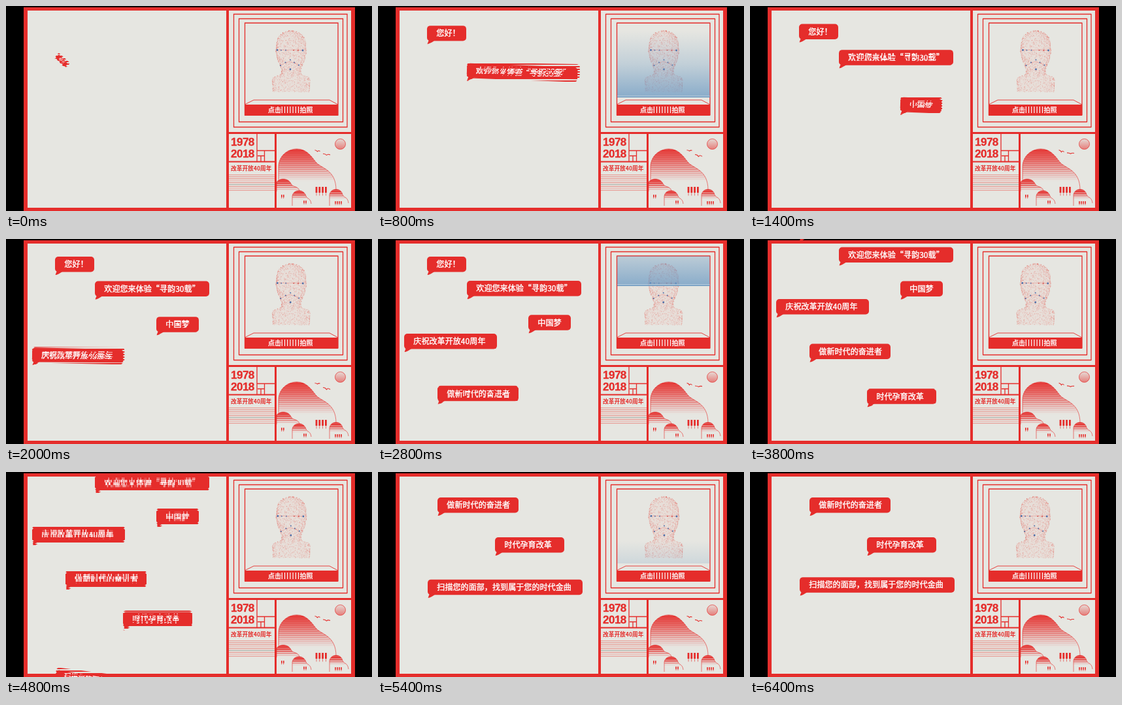
Recreate the animation shown at these times as an HTML page with a canvas. Size 560 px wide and 314 px high, loop 6600 ms.

```html
<!DOCTYPE html>
<html lang="zh-CN">
<head>
<meta charset="utf-8">
<style>
html, body { margin: 0; width: 100%; height: 100%; overflow: hidden; background: #000; }
canvas { display: block; }
</style>
</head>
<body>
<canvas width="560" height="314"></canvas>
<script>
const ctx = document.querySelector('canvas').getContext('2d');
const RED = '#e52d2b', PAPER = '#e6e6e1', BLUE = '#4a6da8';
const LOOP = 6600, STEP = 200, CYCLE = 2200;
const CJK = '"Noto Sans CJK SC", "Noto Sans CJK", sans-serif';
const LATIN_BOLD = 'bold 17px "Liberation Sans", Arial, sans-serif';
const TAU = Math.PI * 2;
const clamp = v => Math.max(0, Math.min(1, v));
const ease = p => p < .5 ? 4 * p ** 3 : 1 - (2 - 2 * p) ** 3 / 2;
const smooth = p => p * p * (3 - 2 * p);

// text, x, settled y, width, entry time
const bubbles = [
  ['您好！', 75, 27, 60, -160],
  ['欢迎您来体验“寻韵30载”', 136, 64, 175, 450],
  ['中国梦', 230, 116, 65, 1050],
  ['庆祝改革开放40周年', 40, 143.5, 142, 1640],
  ['做新时代的奋进者', 91, 211.5, 124, 2290],
  ['时代孕育改革', 179, 272.5, 106, 3150],
  ['扫描您的面部，找到属于您的时代金曲', 76, 333.5, 237, 4500]
];

function box(x0, y0, x1, y1, color) {
  ctx.fillStyle = color;
  ctx.fillRect(x0, y0, x1 - x0, y1 - y0);
}

function line(d, width = 1, color = RED) {
  ctx.strokeStyle = color;
  ctx.lineWidth = width;
  ctx.stroke(new Path2D(d));
}

// A hairline outline gives the regular face a medium weight.
function label(text, x, y, font, color, outline = 0) {
  ctx.font = font;
  ctx.fillStyle = ctx.strokeStyle = color;
  ctx.fillText(text, x, y);
  if (!outline) return;
  ctx.lineWidth = outline;
  ctx.lineJoin = 'round';
  ctx.strokeText(text, x, y);
}

function dot(x, y, r, color) {
  ctx.fillStyle = color;
  ctx.beginPath();
  ctx.arc(x, y, r, 0, TAU);
  ctx.fill();
}

function fade(y0, y1, rgb, ...alphas) {
  const g = ctx.createLinearGradient(0, y0, 0, y1);
  alphas.forEach((a, i) => g.addColorStop(i / (alphas.length - 1), `rgba(${rgb},${a})`));
  return g;
}

// Horizontal bars that get thinner towards the foot.
function hill(d, top, bottom) {
  const path = new Path2D(d);
  ctx.save();
  ctx.clip(path);
  for (let y = top; y < bottom; y += 1.5) {
    box(414, y, 528, y + 1.5 * (1 - (y - top) / (bottom - top)), RED);
  }
  ctx.restore();
  line(d, .6);
}

function trees(x, y, count, gap, width, height) {
  for (let i = 0; i < count; i++) {
    const cx = x + i * gap;
    box(cx - width / 2, y, cx + width / 2, y + height, RED);
    box(cx - .3, y + height, cx + .3, y + height * 1.5, RED);
  }
}

function drawFrames() {
  box(0, 0, 560, 314, '#000');
  box(27, 2, 534, 314, RED);
  box(33, 7, 337, 309, PAPER);
  box(341, 7, 528, 193, PAPER);
  box(341, 196, 411, 309, PAPER);
  box(414, 196, 528, 309, PAPER);
  line('M348.5 12.5H522V185.5H348.5Z M356.5 19.5H515.5V177.5H356.5Z M365.5 26H508V167H365.5Z', 1.3);
}

function drawButton() {
  line('M365 151L379 144H495L508 151', .9);
  box(365, 151, 508, 168, RED);
  label('点击', 401, 163, '10px ' + CJK, '#fff', .35);
  label('拍照', 449.5, 163, '10px ' + CJK, '#fff', .35);
  for (let i = 0; i < 7; i++) box(421.7 + i * 4.2, 154, 422.9 + i * 4.2, 164, '#fff');
}

function drawDates() {
  ctx.letterSpacing = '-.5px';
  label('1978', 344, 214.3, LATIN_BOLD, RED, .3);
  label('2018', 344, 232.3, LATIN_BOLD, RED, .3);
  ctx.letterSpacing = '0px';
  line('M384 196V238 M384 221.5H411 M395.5 222V238 M385 229.5H395 M390 230V238', 1.3);
  line('M341 238.5H411', 2);
  label('改革开放40周年', 344, 252, 'bold 8.7px ' + CJK, RED);
  box(341, 258, 411, 283, 'rgba(229,45,43,.08)');
  for (let i = 0; i < 9; i++) {
    const y = 258.5 + i * 3;
    line(`M341 ${y}H411`, .7, i === 5 ? '#8fb3aa' : i % 4 === 3 ? '#efb9b3' : '#ea8a83');
  }
}

function bird(x, y, size, flap) {
  line(`M${x - size} ${y - flap}Q${x - size / 3} ${y - flap} ${x} ${y + 1}` +
       `Q${x + size / 3} ${y - flap} ${x + size} ${y + flap / 3}`, 1.1);
}

function drawLandscape(t) {
  hill('M417 266V247C417 230 430 219 445 219C460 219 467 230 474 239C482 249 505 250 505 282', 219, 268);
  hill('M414 284V270C417 264 431 262 436 272C438 278 447 275 449 283', 265, 283);
  hill('M438 306V291C440 280 456 280 459 291C461 296 466 294 467 303', 283, 296);
  hill('M495 306V289C497 278 513 278 515 289C517 294 523 292 524 302', 281, 295);
  trees(475, 277, 4, 4.8, 2.8, 9);
  trees(421.8, 289, 2, 3, 1.6, 4);
  trees(456, 298, 2, 3, 1.6, 4);
  trees(504, 299, 4, 3, 1.6, 4);
  ctx.fillStyle = fade(203, 219, '229,45,43', .05, .55);
  ctx.beginPath();
  ctx.arc(511.5, 211.5, 8, 0, TAU);
  ctx.fill();
  ctx.strokeStyle = RED;
  ctx.lineWidth = .7;
  ctx.stroke();
  const beat = Math.sin(t / 190);
  bird(476.5, 222 + beat, 4, 1.3 + beat);
  bird(490.5, 227.5 - 2.5 * beat, 5.5, 1.3 - beat);
}

const profile = [[37, 4], [40, 13], [47, 20], [56, 22.5], [64, 22.5], [66, 24], [73, 22.5],
  [82, 20.5], [90, 17], [97, 14.5], [104, 15.5], [108, 27], [112, 29], [131, 28]];

function halfWidth(y) {
  const i = Math.max(1, profile.findIndex(p => p[0] >= y));
  const [y0, w0] = profile[i - 1], [y1, w1] = profile[i];
  return w0 + (w1 - w0) * (y - y0) / (y1 - y0);
}

function drawHead(t) {
  const turn = -1.5 * Math.cos(t / CYCLE * TAU);
  const cx = 436.5 + turn * .3, fx = 435.5 + turn;
  let seed = 7;
  const random = () => (seed = seed * 16807 % 2147483647) / 2147483647;
  for (let y = 37; y <= 131; y += 1.5) {
    const w = halfWidth(y);
    box(cx - w, y, cx + w, y + 1.5, 'rgba(229,80,70,.06)');
    for (let i = 0; i < 24; i++) {
      const a = (random() - .5) * Math.PI;
      const x = cx + w * Math.sin(a) + turn * Math.cos(a);
      const dy = y + random() * 1.5;
      box(x, dy, x + .8, dy + .8, 'rgba(229,65,55,.3)');
    }
  }
  line(`M${fx - 18} 67.5H${fx + 19} M${fx - 14} 91L${fx - 7} 87Q${fx} 84 ${fx + 7} 87L${fx + 14} 91`,
    .5, 'rgba(229,45,43,.5)');
  for (const x of [-13, -6, 6, 13]) dot(fx + x, 67.7, .9, x < 0 ? BLUE : '#d2453f');
  for (const [x, y, r] of [[-19, 67.5, 1.4], [20, 68, 1.4], [1, 82.5, 1], [-6.5, 86.5, 1],
    [7, 86.5, 1], [-14, 91, 1.1], [14, 90.5, 1.1], [1, 97, 1.4]]) dot(fx + x, y, r, BLUE);
}

function drawScan(t) {
  const front = 72 + (t % CYCLE - 600) * .34;
  const top = Math.max(26, front - 102), bottom = Math.min(140, front);
  if (front < 26 || top >= bottom) return;
  box(366, top, 507.5, bottom, fade(front - 102, front, '110,155,195', 0, .3, .78));
  if (front <= 141) {
    box(366, front - 2.4, 507.5, front - 1.4, '#c9dae4');
    box(366, front - 1.2, 507.5, front, '#5f8fba');
  }
}

function drawBubble([text, x, y, w, start], t, scroll) {
  const age = t - start, h = 23.5, pivot = 6;
  if (age <= 0) return;
  const grow = smooth(clamp(age / 375));
  ctx.save();
  ctx.translate(x + pivot, y + pivot - scroll + 71 * Math.exp(-.0033 * age));
  ctx.rotate((1 - grow) * 70 * Math.PI / 180);
  ctx.scale(grow, grow);
  ctx.translate(-pivot, -pivot);
  ctx.fillStyle = RED;
  ctx.beginPath();
  ctx.roundRect(0, 0, w, h, 5);
  ctx.fill();
  ctx.fill(new Path2D(`M3 ${h - 2}L.5 ${h + 4.5}Q3 ${h + 5} 12 ${h - 1}Z`));
  label(text, 14.3, 16.3, '12.1px ' + CJK, '#fff', .4);
  ctx.restore();
}

function drawChat(t) {
  const scroll = 51.5 * ease(clamp((t - 3100) / 600)) + 121 * ease(clamp((t - 4640) / 600));
  for (const b of bubbles) drawBubble(b, t, scroll);
}

// Two interlaced fields, slightly apart in time, comb anything that moves.
function drawInterlaced(t) {
  for (const field of [0, 1]) {
    ctx.save();
    ctx.beginPath();
    for (let y = field * 2; y < 314; y += 4) ctx.rect(27, y, 310, 2);
    ctx.clip();
    drawChat(t - field * 15);
    ctx.restore();
  }
}

let shown = -1;
function tick(now) {
  const t = Math.floor(now / STEP) * STEP % LOOP;
  if (t !== shown) {
    shown = t;
    drawFrames();
    drawHead(t);
    drawScan(t);
    drawButton();
    drawDates();
    drawLandscape(t);
    drawInterlaced(t);
  }
  requestAnimationFrame(tick);
}
requestAnimationFrame(tick);
</script>
</body>
</html>
```
